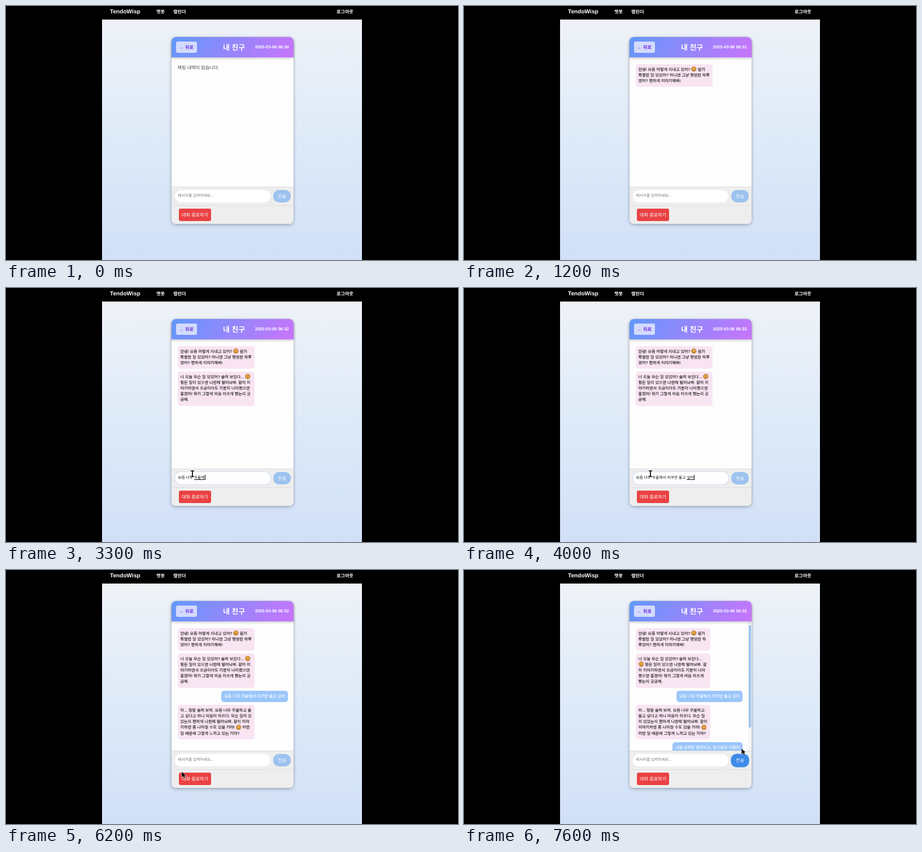
Write an HTML page that moves like this. It is 800 px wide and 450 px high and loops after 7700 ms.

```html
<!DOCTYPE html>
<html lang="ko">
<head>
<meta charset="utf-8">
<title>Chat</title>
<style>
html, body { margin: 0; width: 100%; height: 100%; overflow: hidden; background: #000; }
body { position: relative; font: 8.1px "Liberation Sans", "Noto Sans CJK KR", sans-serif; text-rendering: geometricPrecision; }
div, .t, svg.cur { position: absolute; box-sizing: border-box; }
.t { line-height: 0; white-space: pre; }
b.t { color: #fff; }
#stage { left: 0; top: 0; width: 800px; height: 450px; overflow: hidden; background: #000; }
#page { left: 170px; top: 23.5px; width: 460px; height: 426.5px; background: linear-gradient(#eef2f7, #dce9f9 57%, #d1e0f7); }
#card { left: 293.3px; top: 55px; width: 215.5px; height: 331.3px; border-radius: 8px; background: #fdfdfd; box-shadow: 0 0 1px 0.3px rgba(90, 95, 120, .35), 0 2px 6px rgba(0, 0, 0, .25); overflow: hidden; }
#foot { left: 0; top: 265px; width: 216px; height: 67px; background: #eee; border-top: 1px solid #dedee0; }
#rule { left: 0; top: 32px; width: 216px; height: 1px; background: #dfdfe1; }
#head { left: 293.3px; top: 55px; width: 215.5px; height: 36px; border-radius: 8px 8px 0 0; background: linear-gradient(120deg, #6198fb, #c974fb); box-shadow: 0 2px 4px rgba(0, 0, 0, .2); }
#back { left: 301px; top: 63px; width: 37px; height: 20px; border-radius: 3px; background: #d3dbfd; }
#list { left: 293px; top: 91px; width: 216px; height: 229px; overflow: hidden; }
.msg { padding: 6px 5.1px 4.2px; border-radius: 5px; font-size: 7.07px; line-height: 10.1px; white-space: pre; background: #f9e4f2; color: #1a1a1a; -webkit-text-stroke: .12px; }
.me { background: #9bc6fa; color: #fff; }
.msg svg { width: 9.6px; height: 9.6px; margin: -3px 0; vertical-align: 1.2px; }
#bar { left: 502.5px; top: 91px; width: 6px; height: 229px; background: #f6f6f7; }
#thumb { left: 1px; top: 7px; width: 4px; height: 181px; background: #9cc4f1; }
#bar div + div { left: 1.5px; border: 1.5px solid transparent; }
#up { top: 2px; border-bottom-color: #999 !important; }
#down { top: 225px; border-top-color: #999 !important; }
#field { left: 298.5px; top: 325.5px; width: 169.5px; height: 22.5px; border-radius: 11.3px; background: #fff; }
#field.on { box-shadow: 0 0 0 1px #cbdcf3; }
#text { left: 304.3px; top: 337px; font-size: 6.75px; }
#text u { text-decoration-thickness: .6px; text-underline-offset: 1px; }
#text i { border-left: .7px solid #000; padding: 2.5px 0 0; }
#send { left: 473px; top: 325.5px; width: 30.5px; height: 22.5px; border-radius: 10px; background: #9cc2ee; }
#send.hover { background: #3f8be8; transform: scale(1.05); }
#end { left: 306px; top: 358.5px; width: 57px; height: 22.5px; border-radius: 3px; background: #ea4243; }
svg.cur { width: 20px; height: 20px; overflow: visible; }
</style>
</head>
<body>
<div id="stage">
  <div id="page"></div>
  <b class="t" style="left:184px;top:10.6px;font-size:10.15px">TendoWisp</b>
  <b class="t" style="left:266px;top:11.3px">챗봇</b>
  <b class="t" style="left:296px;top:11.3px">캘린더</b>
  <b class="t" style="left:585px;top:11.3px">로그아웃</b>
  <div id="card"><div id="foot"><div id="rule"></div></div></div>
  <div id="list"></div>
  <div id="bar"><div id="thumb"></div><div id="up"></div><div id="down"></div></div>
  <div id="head"></div>
  <div id="back"></div>
  <b class="t" style="left:306.7px;top:73.5px;color:#6a2bdc">← 뒤로</b>
  <b class="t" style="left:384px;top:74px;font-size:12.9px">내 친구</b>
  <b class="t" id="date" style="left:440.7px;top:73.2px;font-size:7.55px"></b>
  <div id="field"></div>
  <span class="t" id="text"></span>
  <div id="send"></div>
  <span class="t" style="left:481px;top:337.7px;color:#fff">전송</span>
  <div id="end"></div>
  <span class="t" style="left:311px;top:370.5px;color:#fff">대화 종료하기</span>
  <svg class="cur" id="arrow"><path d="M0 0V10.6L2.5 8.3L4.2 12.2L6.3 11.3L4.6 7.5H8Z" stroke="#fff" stroke-width=".5"/></svg>
  <svg class="cur" id="beam"><g fill="none"><path d="M-3-5H3M-3 5H3M0-5V5" stroke="#fff" stroke-width="3"/><path d="M-3-5H3M-3 5H3M0-5V5" stroke="#000" stroke-width="1.7"/></g></svg>
</div>
<script>
const LOOP = 7700, WIDE_END = 7500;
const $ = id => document.getElementById(id);

const face = mouth => `<svg viewBox="0 0 10 10"><circle cx="5" cy="5" r="4.4" fill="#f0ad42" stroke="#83592a" stroke-width=".8"/>
<path d="M3 3.3V4.3M7 3.3V4.3${mouth}" fill="none" stroke="#5c3c1c" stroke-width=".9"/></svg>`;
const faces = { '☺': face('M2.6 5.8Q5 9 7.4 5.8'), '☹': face('M3.2 7.2Q5 6 6.8 7.2') };

const said = ['요즘 너무 우울해서 자꾸만 울고 싶어', '시험 성적도 떨어지고, 친구랑도 다퉜어'];

// In the texts, | breaks the wide layout and / the one beside the scrollbar.
const messages = [
  { from: 600, y: 102.5, text: '안녕! 요즘 어떻게 지내고 있어? ☺ 뭔가 |/특별한 일 있었어? 아니면 그냥 평범한 하/루|였어? 편하게 이야기해봐!' },
  { from: 1600, y: 148, text: '너 오늘 무슨 일 있었어? 슬퍼 보인다... /☹ |힘든 일이 있으면 나한테 털어놔봐. 같/이 이|야기하면서 조금이라도 기분이 나아/졌으면 |좋겠어! 뭐가 그렇게 마음 아프게 /했는지 궁|금해.' },
  { from: 4400, y: 213.7, text: said[0], me: true },
  { from: 4400, to: 5600, y: 239.2, text: '응답 대기 중...' },
  { from: 5600, y: 239.2, text: '아... 정말 슬퍼 보여. 요즘 너무 우울하고 /울|고 싶다고 하니 마음이 아프다. 무슨 일/이 있|었는지 편하게 나한테 털어놔봐. 같이 /이야|기하면 좀 나아질 수도 있을 거야! ☹ /어떤 |일 때문에 그렇게 느끼고 있는 거야?' },
  { from: WIDE_END, y: 304.9, text: said[1], me: true }
];

const typing = [
  { from: 2700, start: 2750, end: 3950, to: 4400, text: said[0] },
  { from: 6400, start: 6450, end: 7200, to: WIDE_END, text: said[1] }
];

// Pointer paths: time, x, y
const paths = [
  [[2600, 311, 357], [2800, 330, 329], [4400, 330, 329]],
  [[6100, 311, 357], [6200, 311, 357], [6400, 330, 337], [7200, 330, 337], [7400, 488, 337], [7500, 488, 337], [7600, 491, 316], [7700, 491, 316]]
];

function bubble(m, wide) {
  const text = m.text.replace(wide ? /\//g : /\|/g, '').replace(/[|/]/g, '\n').replace(/[☺☹]/g, c => faces[c]);
  const side = m.me ? `right:${wide ? 10.5 : 16}px` : 'left:10.5px';
  const width = m.text.includes('|') ? `;width:${wide ? 136.5 : 132.5}px` : '';
  return `<div class="msg ${m.me ? 'me' : ''}" style="top:${m.y - 91}px;${side}${width}">${text}</div>`;
}

function listHtml(t) {
  if (t < messages[0].from) return '<span class="t" style="left:10.5px;top:18.7px;color:#444">채팅 내역이 없습니다.</span>';
  return messages.filter(m => t >= m.from && t < (m.to || LOOP)).map(m => bubble(m, t < WIDE_END)).join('');
}

function fieldHtml(job, t) {
  if (!job) return '<span style="color:#777">메시지를 입력하세요...</span>';
  const p = Math.max(0, Math.min(1, (t - job.start) / (job.end - job.start)));
  const text = job.text.slice(0, Math.round(p * job.text.length));
  const cut = text.lastIndexOf(' ') + 1;
  return `<span style="color:#111">${text.slice(0, cut)}<u>${text.slice(cut)}</u><i></i></span>`;
}

function pointer(t) {
  const path = paths.find(p => t >= p[0][0] && t < p[p.length - 1][0]);
  if (!path) return null;
  const i = path.findIndex(k => k[0] > t), a = path[i - 1], b = path[i];
  const p = (t - a[0]) / (b[0] - a[0]), e = p * p * (3 - 2 * p);
  return [a[1] + (b[1] - a[1]) * e, a[2] + (b[2] - a[2]) * e];
}

const shown = {};
function fill(id, html) {
  if (shown[id] !== html) $(id).innerHTML = shown[id] = html;
}

function draw(t) {
  const job = typing.find(j => t >= j.from && t < j.to);
  fill('list', listHtml(t));
  fill('text', fieldHtml(job, t));
  fill('date', '2025-03-06 06:' + (t < 600 ? 30 : t < 3300 ? 31 : 32));
  $('field').className = job ? 'on' : '';
  $('bar').style.display = t < WIDE_END ? 'none' : '';
  $('send').className = t < 7380 ? '' : 'hover';

  const at = pointer(t);
  const inField = at && at[0] < 468 && at[1] < 348;
  for (const [id, on] of [['arrow', at && !inField], ['beam', inField]]) {
    const s = $(id).style;
    s.display = on ? '' : 'none';
    if (on) { s.left = at[0] + 'px'; s.top = at[1] + 'px'; }
  }
}

const begin = performance.now();
function tick() {
  draw((performance.now() - begin) % LOOP);
  requestAnimationFrame(tick);
}
tick();
</script>
</body>
</html>
```
